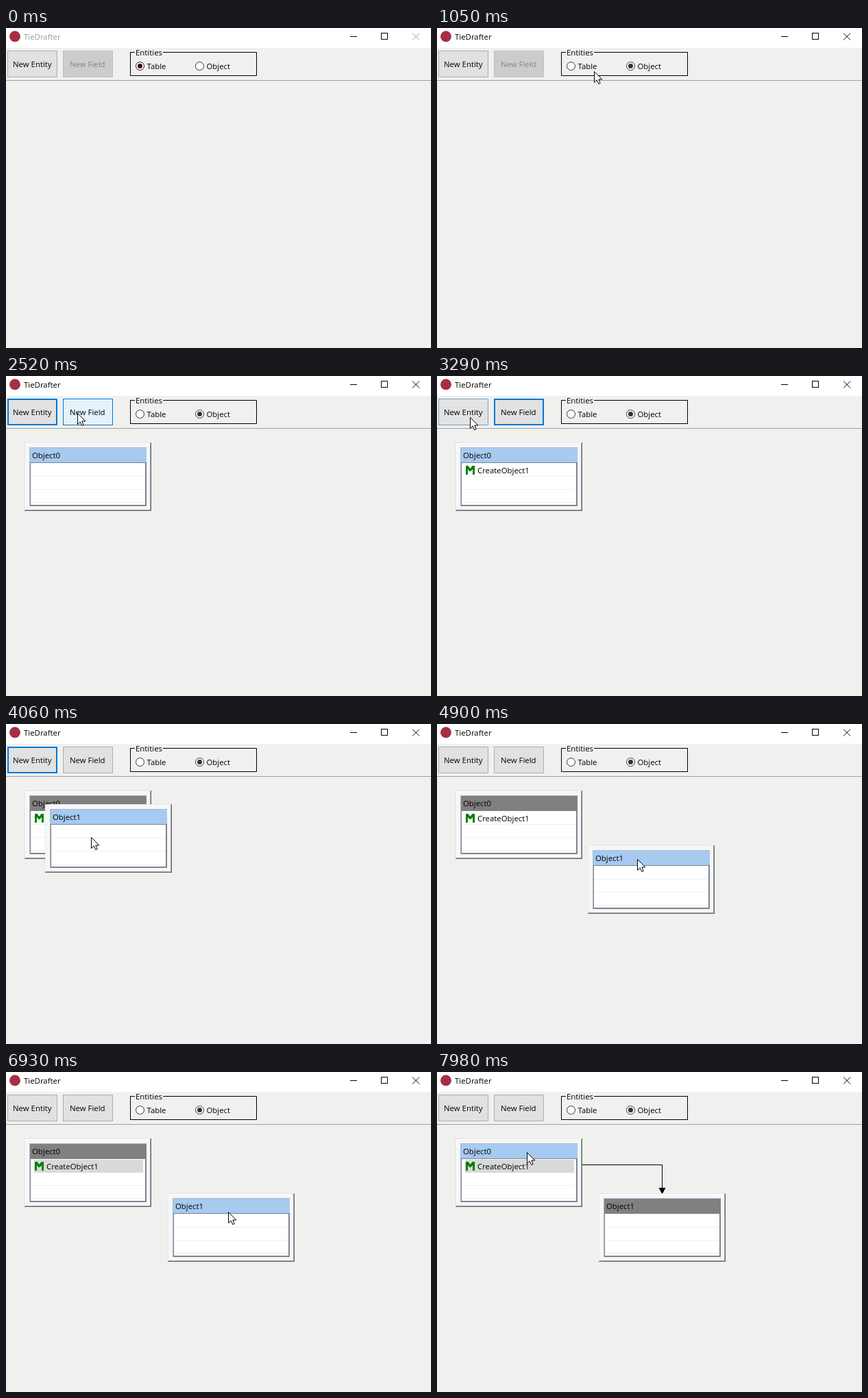
These frames come from a looping animation (620x467 px, 8000 ms). An HTML page:

```html
<!DOCTYPE html>
<html lang="en">
<head>
<meta charset="utf-8">
<title>TieDrafter</title>
<style>
html, body { margin: 0; width: 100%; height: 100%; overflow: hidden; background: #f0f0ef; }
svg { display: block; width: 620px; height: 467px; }
text { font: 11.4px "Open Sans", "Noto Sans", sans-serif; fill: #000; white-space: pre; }
rect, .line { shape-rendering: crispEdges; }
.line { fill: none; stroke: #000; }
</style>
</head>
<body>
<svg id="stage" viewBox="0 0 620 467"></svg>
<script>
const LOOP = 8000, STEP = 70;
const BLUE = '#0078d7', ACTIVE = '#a6caf0', IDLE = '#808080';
const stage = document.getElementById('stage');

function add(parent, tag, attrs, label) {
  const node = document.createElementNS('http://www.w3.org/2000/svg', tag);
  set(node, attrs);
  if (label) node.textContent = label;
  parent.appendChild(node);
  return node;
}
function set(node, attrs) {
  for (const key in attrs) node.setAttribute(key, attrs[key]);
}
const show = (node, on) => set(node, { visibility: on ? 'visible' : 'hidden' });
const box = (parent, x, y, width, height, fill) =>
  add(parent, 'rect', { x, y, width, height, fill });
const path = (parent, d, attrs) => add(parent, 'path', { d, class: 'line', ...attrs });
const label = (parent, x, y, str) => add(parent, 'text', { x, y }, str);

// Title bar
box(stage, 0, 0, 620, 467, '#f0f0ef');
box(stage, 0, 0, 620, 29, '#fff');
add(stage, 'circle', { cx: 13, cy: 12.3, r: 8, fill: '#a62f45' });
const caption = label(stage, 26, 17, 'TieDrafter');
const controls = [
  path(stage, 'M502 12.5H512'),
  path(stage, 'M547.5 7.5H556.5V16.5H547.5Z'),
  add(stage, 'path', { d: 'M593 7.5L603 17.5M603 7.5L593 17.5' })
];

// Toolbar
box(stage, 0, 76, 620, 1, '#a0a0a0');
path(stage, 'M188 35.5H181.5V69.5H365.5V35.5H229', { stroke: '#dcdcdc' });
label(stage, 189, 40, 'Entities');

function button(x, tx, str) {
  const edge = box(stage, x, 33, 73, 39), face = box(stage, 0, 0, 0, 0);
  return { x, edge, face, text: label(stage, tx, 57, str) };
}
const entityBtn = button(2, 10, 'New Entity');
const fieldBtn = button(83, 93, 'New Field');
const LOOKS = {
  off: ['#bfbfbf', '#cccccc', 1],
  idle: ['#adadad', '#e1e1e1', 1],
  focus: [BLUE, '#e1e1e1', 2],
  fade: ['#7ba1bd', '#e1e3e5', 1],
  hover: [BLUE, '#e5f1fb', 1],
  press: ['#005499', '#cce4f7', 1]
};
function paint(btn, look) {
  const [edge, fill, w] = LOOKS[look];
  set(btn.edge, { fill: edge });
  set(btn.face, { x: btn.x + w, y: 33 + w, width: 73 - 2 * w, height: 39 - 2 * w, fill });
  btn.text.style.fill = look === 'off' ? '#8d8083' : '#000';
}

function radio(cx, str) {
  const ring = add(stage, 'circle', { cx, cy: 55.6, r: 6, fill: '#fff' });
  const dot = add(stage, 'circle', { cx, cy: 55.6, r: 3.5, fill: '#333' });
  label(stage, cx + 10, 60, str);
  return { ring, dot };
}
const tableOpt = radio(195.5, 'Table');
const objectOpt = radio(282.5, 'Object');

// Entity windows, drawn from their own top left corner
function entity(str) {
  const g = add(stage, 'g', {});
  box(g, 0, 0, 185, 100, '#696969');
  box(g, 0, 0, 184, 99, '#e3e3e3');
  box(g, 1, 1, 183, 98, '#a0a0a0');
  box(g, 1, 1, 182, 97, '#fff');
  box(g, 2, 2, 181, 96, '#f4f6fa');
  box(g, 7, 7, 171, 86, '#b4b8be');
  const bar = box(g, 8, 8, 170, 22);
  box(g, 8, 29, 170, 64, '#7d848d');
  box(g, 9, 30, 167, 61, '#fff');
  for (const y of [49, 68, 87]) box(g, 9, y, 167, 1, '#f0f0f0');
  label(g, 11, 23, str);
  return { g, bar };
}
const first = entity('Object0');
const item = add(first.g, 'g', {});
const row = box(item, 14, 31, 159, 19, '#cce8ff');
add(item, 'path', {
  d: 'M15 34H18.5L21.5 38L24.5 34H28V47H25V39L22.5 42H20.5L18 39V47H15Z', fill: '#008000'
});
label(item, 32, 45, 'CreateObject1');

const link = add(stage, 'g', {});
path(link, 'M212 135.5H328.5V170');
add(link, 'path', { d: 'M323.5 169H333.5L328.5 178.5Z' });
const second = entity('Object1');

const cursor = add(stage, 'path', {
  d: 'M.5 .5V16.5L4.2 13L6.8 18.6L9.2 17.5L6.8 12H11.8Z',
  fill: '#fff', stroke: '#000', 'stroke-width': 1
});

// Pointer track: time, x, y, and 1 where the move runs at even speed
const TRACK = [
  [70, 534, 455], [840, 284, 57], [910, 284, 58],
  [1330, 120, 73, 1], [1680, 38, 56], [2100, 38, 56],
  [2660, 116, 54], [2940, 116, 54], [3290, 48, 60], [3710, 48, 60],
  [4060, 124, 165], [4480, 129, 137], [4550, 129, 137],
  [4900, 292, 197, 1], [5110, 308, 197], [5320, 308, 197],
  [5880, 153, 141], [6020, 153, 141], [6790, 316, 200],
  [6860, 313, 193], [6930, 324, 204], [7280, 324, 204],
  [7770, 131, 117], [LOOP, 131, 117]
];
function pointer(t) {
  let i = 1;
  while (i < TRACK.length - 1 && TRACK[i][0] < t) i++;
  const a = TRACK[i - 1], b = TRACK[i];
  let k = Math.min(1, Math.max(0, (t - a[0]) / (b[0] - a[0])));
  if (!b[3]) k = k * k * (3 - 2 * k);
  return [a[1] + (b[1] - a[1]) * k, a[2] + (b[2] - a[2]) * k].map(Math.round);
}

const within = (t, a, b) => t >= a && t < b;

function draw(t) {
  const [x, y] = pointer(t);
  const over = (l, top, r, b) => x >= l && x < r && y >= top && y < b;
  const overBtn = btn => over(btn.x, 33, btn.x + 73, 72);

  const awake = t >= 910;
  caption.style.fill = awake ? '#000' : '#999';
  controls.forEach(c => set(c, { stroke: awake ? '#000' : '#999' }));

  const picked = t >= 840;
  show(tableOpt.dot, !picked);
  show(objectOpt.dot, picked);
  set(tableOpt.dot, { fill: '#300a20' });
  set(tableOpt.ring, { stroke: t < 840 ? '#300a20' : '#333' });
  set(objectOpt.ring, { stroke: t >= 70 && over(276, 49, 340, 64) ? BLUE : '#333' });

  let look = 'idle';
  if (within(t, 1750, 2030) || within(t, 3430, 3640)) look = 'press';
  else if (within(t, 3220, 3360)) look = overBtn(entityBtn) ? 'fade' : 'idle';
  else if (t >= 910 && overBtn(entityBtn)) look = 'hover';
  else if (within(t, 2030, 2800) || within(t, 3640, 4550)) look = 'focus';
  paint(entityBtn, look);

  look = 'idle';
  if (t < 2030) look = 'off';
  else if (within(t, 2800, 2940)) look = 'press';
  else if (overBtn(fieldBtn)) look = 'hover';
  else if (within(t, 2940, 3430)) look = 'focus';
  paint(fieldBtn, look);

  const firstOn = t < 3780 || t >= 7980;
  set(first.g, { transform: 'translate(27 97)', });
  set(first.bar, { fill: firstOn ? ACTIVE : IDLE });
  show(first.g, t >= 2030);
  show(item, t >= 2940);

  const chosen = t >= 6090;
  const hot = t >= 5390 && over(41, 128, 200, 147);
  show(row, chosen || hot);
  set(row, { fill: chosen ? '#d9d9d9' : '#cce8ff' });

  // The second window is carried by its title bar
  const [hx, hy] = pointer(Math.min(5110, Math.max(4550, t)));
  set(second.g, { transform: `translate(${hx - 72} ${hy - 20})` });
  set(second.bar, { fill: firstOn ? IDLE : ACTIVE });
  show(second.g, t >= 3780);
  show(link, t >= 7350);

  set(cursor, { transform: `translate(${x} ${y})` });
  show(cursor, t >= 70);
}

function tick(now) {
  draw(Math.floor(now % LOOP / STEP) * STEP);
  requestAnimationFrame(tick);
}
draw(0);
requestAnimationFrame(tick);
</script>
</body>
</html>
```
